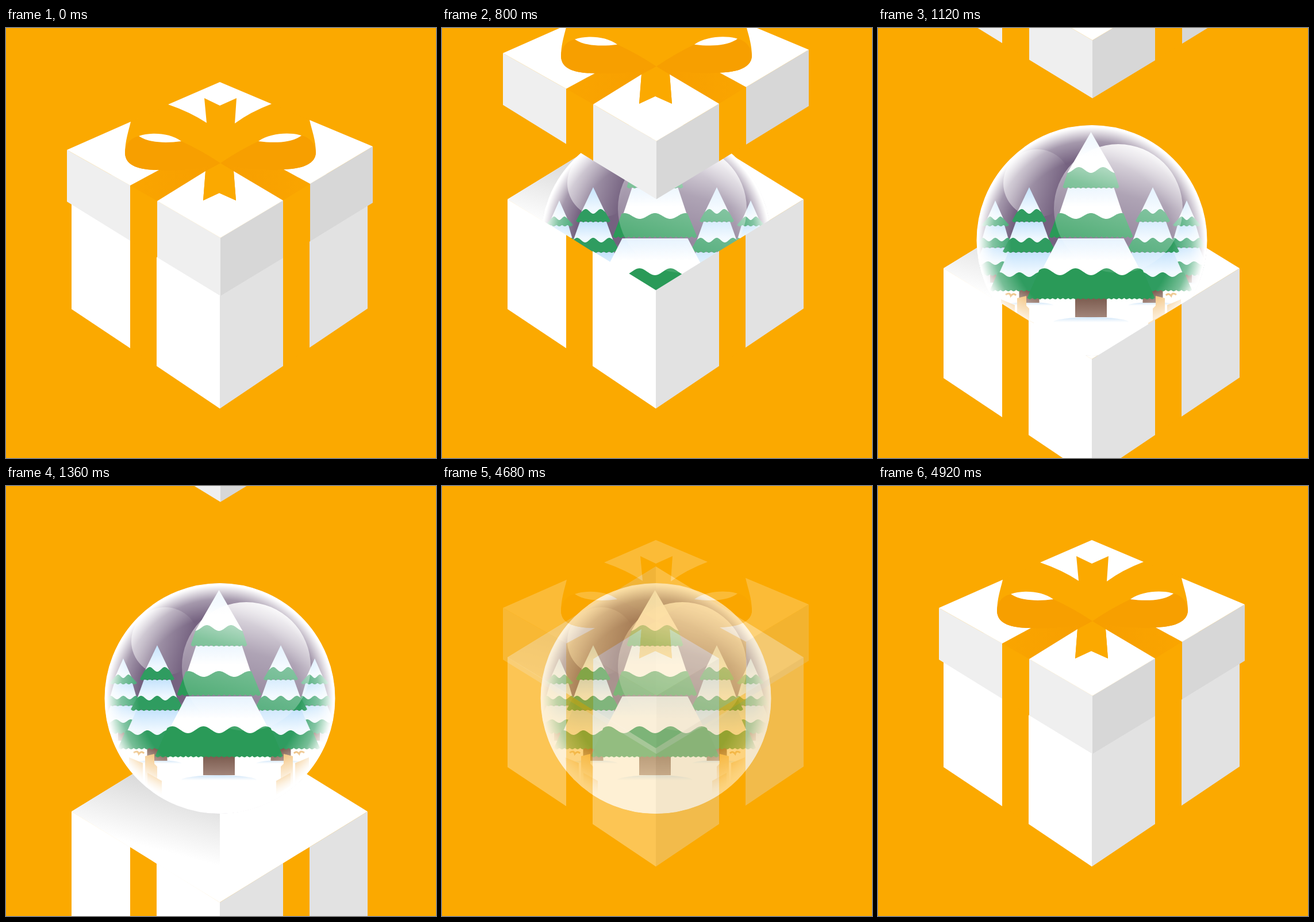
An HTML page that plays this animation: 748x748 px, repeating every 5 s.

```html
<!DOCTYPE html>
<html lang="en">
<head>
<meta charset="utf-8">
<title>Gift box with snow globe</title>
<style>
  html, body { margin: 0; width: 100%; height: 100%; overflow: hidden; background: #fba900; }
  svg { display: block; width: 100%; height: 100%; }
</style>
</head>
<body>
<svg viewBox="0 0 748 748">
  <defs>
    <clipPath id="ball"><circle cx="372" cy="369.500" r="200"/></clipPath>
    <radialGradient id="rim">
      <stop offset=".7" stop-color="#fff" stop-opacity="0"/>
      <stop offset=".86" stop-color="#fff" stop-opacity=".35"/>
      <stop offset=".96" stop-color="#fff" stop-opacity=".88"/>
      <stop offset=".985" stop-color="#fff"/>
    </radialGradient>
    <linearGradient id="ground" x2="0" y2="1">
      <stop stop-color="#fff" stop-opacity="0"/>
      <stop offset="1" stop-color="#fff"/>
    </linearGradient>
    <linearGradient id="bubbleLeft" x1="0" y1=".35" x2=".85" y2=".6">
      <stop stop-color="#fff" stop-opacity=".6"/>
      <stop offset="1" stop-color="#fff" stop-opacity="0"/>
    </linearGradient>
    <linearGradient id="bubbleRight" x1=".68" y1="0" x2=".4" y2="1">
      <stop stop-color="#fff" stop-opacity=".95"/>
      <stop offset=".4" stop-color="#fff" stop-opacity=".42"/>
      <stop offset="1" stop-color="#fff" stop-opacity=".1"/>
    </linearGradient>
    <linearGradient id="snow" x2="0" y2="1">
      <stop stop-color="#e0f0fe"/>
      <stop offset=".6" stop-color="#fff"/>
    </linearGradient>
    <linearGradient id="iceSnow" x2="0" y2="1">
      <stop stop-color="#c5e3fc"/>
      <stop offset=".8" stop-color="#eff8ff"/>
    </linearGradient>
    <linearGradient id="bark" x2="0" y2="1">
      <stop stop-color="#79594c"/>
      <stop offset="1" stop-color="#a18479"/>
    </linearGradient>
    <linearGradient id="mound" x2="0" y2="1">
      <stop stop-color="#cfe5f8"/>
      <stop offset=".5" stop-color="#fff"/>
    </linearGradient>
    <linearGradient id="gold" x2="0" y2="1">
      <stop stop-color="#f2bf75"/>
      <stop offset="1" stop-color="#fdf0dc"/>
    </linearGradient>
    <linearGradient id="wall" gradientUnits="userSpaceOnUse" x1="200" y1="225" x2="170" y2="340">
      <stop stop-color="#d9d9d9"/>
      <stop offset="1" stop-color="#fff"/>
    </linearGradient>
    <linearGradient id="fold" gradientUnits="userSpaceOnUse" x1="216" y1="0" x2="528" y2="0">
      <stop stop-color="#faa500"/>
      <stop offset=".5" stop-color="#f79e00"/>
      <stop offset="1" stop-color="#faa500"/>
    </linearGradient>
  </defs>

  <rect width="748" height="748" fill="#fba900"/>

  <g id="back">
    <path fill="#fff" d="M114 298L372 140L629 298L372 456Z"/>
    <path fill="url(#wall)" d="M114 298L372 140V456Z"/>
  </g>

  <g id="globe">
    <g clip-path="url(#ball)">
      <rect x="172" y="169" width="400" height="402" fill="#756280"/>
      <circle cx="277" cy="270" r="59" fill="url(#bubbleLeft)"/>
      <rect x="172" y="375" width="400" height="85" fill="url(#ground)"/>
      <rect x="172" y="459" width="400" height="115" fill="#fff"/>
      <g id="side">
        <g id="farTree"></g>
        <g id="nearTree"></g>
        <g fill="url(#gold)">
          <path d="M214 472L238 482V520L214 505Z"/>
          <path d="M242 470L258 466V483L263 488V512L242 520Z"/>
          <path d="M246 499L271 513V537L246 522Z"/>
          <path fill="none" stroke="#e9b164" stroke-width="3" d="M222 464q7 -5 9 2q5 -6 9 -1"/>
        </g>
      </g>
      <use href="#side" transform="translate(741) scale(-1 1)"/>
      <g id="mainTree"></g>
      <circle cx="418" cy="314" r="112" fill="url(#bubbleRight)"/>
      <circle cx="372" cy="369.500" r="200.500" fill="url(#rim)"/>
    </g>
    <circle cx="372" cy="369.500" r="199" fill="none" stroke="#fff" stroke-width="3"/>
  </g>

  <g id="front">
    <path fill="#fba900" d="M216 360L262 389V588L216 557ZM482 388L528 360V556L482 588Z"/>
    <path fill="#fff" d="M114 298L216 360V557L114 489ZM262 388L372 456V662L262 588Z"/>
    <path fill="#e2e2e2" d="M372 456L482 388V588L372 662ZM528 360L629 298V488L528 556Z"/>
  </g>

  <g id="lid">
    <path fill="#fba900" d="M106 212L372 94L638 206L529 271V371L482 400V300L373 365L263 301V399L216 370V274Z"/>
    <path fill="#efefef" d="M106 212L216 274V370L106 302ZM263 301L373 365V466L263 399Z"/>
    <path fill="#d7d7d7" d="M373 365L482 300V400L373 466ZM529 271L638 206V304L529 371Z"/>
    <path fill="url(#fold)" d="M216 274L266 247L373 235L483 246L529 271L482 300L396 249H347L263 301Z"/>
    <g fill="#fff">
      <path d="M106 212L217 163C213 180 207 197 207 218C208 240 232 247 266 247L216 274Z"/>
      <path d="M638 206L528 160C532 178 539 195 539 217C538 237 515 245 483 246L529 271Z"/>
      <path d="M282 133L372 94L462 132Q425 146 398 166L401 122L372 135L345 122L349 165Q320 146 282 133Z"/>
      <path d="M263 301L347 249L343 300L371 287L400 300L396 249L482 300L373 365Z"/>
    </g>
    <g fill="#f79f00">
      <path d="M231 188C245 200 275 200 305 197Q340 213 373 235Q325 250 266 247C232 247 208 240 207 218C207 202 217 191 231 188Z"/>
      <path d="M514 187C500 200 470 200 439 197Q405 213 373 235Q425 250 483 246C515 245 538 237 539 217C539 202 528 190 514 187Z"/>
    </g>
    <path fill="#fba900" d="M347 249L373 235L396 249L400 300L371 287L343 300Z"/>
    <path fill="#fff" d="M231 188C250 181 285 182 305 197C275 201 247 199 231 188ZM514 187C495 181 460 182 439 197C470 201 498 199 514 187Z"/>
  </g>
</svg>

<script>
const LOOP = 5000, STEP = 80, HOLD = 1680, FADE = 4680;
const $ = id => document.getElementById(id);

// One tier: a snow trapezoid on top of a green band with a wavy top and a scalloped hem.
// Each level is [y, half width]; a negative swell puts a trough at the middle.
function tier(cx, [y0, w0], [y1, w1], [y2, w2], wave, swell, snow, green) {
  const points = [];
  for (let x = -w1; x <= w1; x += w1 / 40)
    points.push([cx + x, y1 - swell * Math.cos(2 * Math.PI * x / wave)]);
  const teeth = Math.round(w2 / 4.5);
  for (let i = 0; i <= 96; i++) {
    const u = i / 96;
    points.push([cx + w2 * (1 - 2 * u), y2 - 2.5 + 2.5 * Math.abs(Math.sin(Math.PI * teeth * u))]);
  }
  const band = points.map(p => p.map(n => n.toFixed(1)).join()).join(' ');
  const low = y1 + Math.abs(swell);
  return `<path fill="url(#${snow})" d="M${cx - w0} ${y0}H${cx + w0}L${cx + w1} ${low}H${cx - w1}Z"/>` +
    `<polygon fill="${green}" points="${band}"/>`;
}

function tree(id, cx, snow, green, trunk, mound, tiers) {
  const [half, top, bottom] = trunk;
  const [rx, y, ry] = mound;
  $(id).innerHTML =
    `<ellipse cx="${cx}" cy="${y}" rx="${rx}" ry="${ry}" fill="url(#mound)"/>` +
    `<rect x="${cx - half}" y="${top}" width="${2 * half}" height="${bottom - top}" fill="url(#bark)"/>` +
    tiers.reverse().map(t => tier(cx, ...t, snow, green)).join('');
}

tree('farTree', 204, 'iceSnow', '#3fa571', [9, 425, 443], [26, 447, 4], [
  [[300, 0], [331, 15], [345, 24], 18, -3],
  [[343, 16], [368, 24], [383, 33], 22, 3],
  [[382, 22], [409, 34], [431, 46], 26, -3]
]);
tree('nearTree', 263, 'iceSnow', '#2f9c60', [17.5, 455, 478], [43, 483, 6], [
  [[277, 0], [319, 22], [338, 30], 26, -4],
  [[337, 23], [369, 36], [391, 46], 28, 4],
  [[390, 36], [429, 55], [458, 68], 34, -4]
]);
tree('mainTree', 370.5, 'snow', '#2a9a58', [27.5, 467, 503], [66, 512, 9], [
  [[181, 0], [247, 41], [279, 49], 42, -5],
  [[278, 40], [327, 58], [365, 73], 53, 5],
  [[366, 57], [424, 90], [472, 111], 54, -6]
]);

// Motion runs in steps; the globe rests alone between HOLD and FADE.
function stepped(t) {
  const base = t < FADE ? 0 : FADE;
  const time = base + Math.floor((t - base) / STEP + 1e-6) * STEP;
  return t >= HOLD && t < FADE ? HOLD : time;
}

function pose(t) {
  const fade = t < FADE ? 0 : Math.min(1, ((t - FADE) / STEP + 1) / 4);
  const gone = t === HOLD;
  const closed = t < 640 || fade > 0;
  const rise = Math.max(0, (t - 560) / 1400);
  const lidY = closed ? 0 : -537 * (1 - (1 - rise) ** 2);
  const boxY = closed ? 0 : 120 * Math.pow(Math.max(0, t - 880) / 240, 1.16);
  const boxAlpha = fade ? fade ** 0.8 : gone ? 0 : 1;
  const lidAlpha = fade ? fade ** 1.1 : gone ? 0 : 1;
  return {
    back: [boxY, boxAlpha],
    globe: [0, fade ? 1 - fade : t < 640 ? 0 : 1],
    front: [boxY, boxAlpha],
    lid: [lidY, lidAlpha]
  };
}

function draw(now) {
  for (const [id, [y, alpha]] of Object.entries(pose(stepped(now % LOOP)))) {
    $(id).setAttribute('transform', `translate(0 ${y.toFixed(2)})`);
    $(id).setAttribute('opacity', alpha);
  }
}

let start;
function tick(now) {
  start ??= now;
  draw(now - start);
  requestAnimationFrame(tick);
}
draw(0);
requestAnimationFrame(tick);
</script>
</body>
</html>
```
